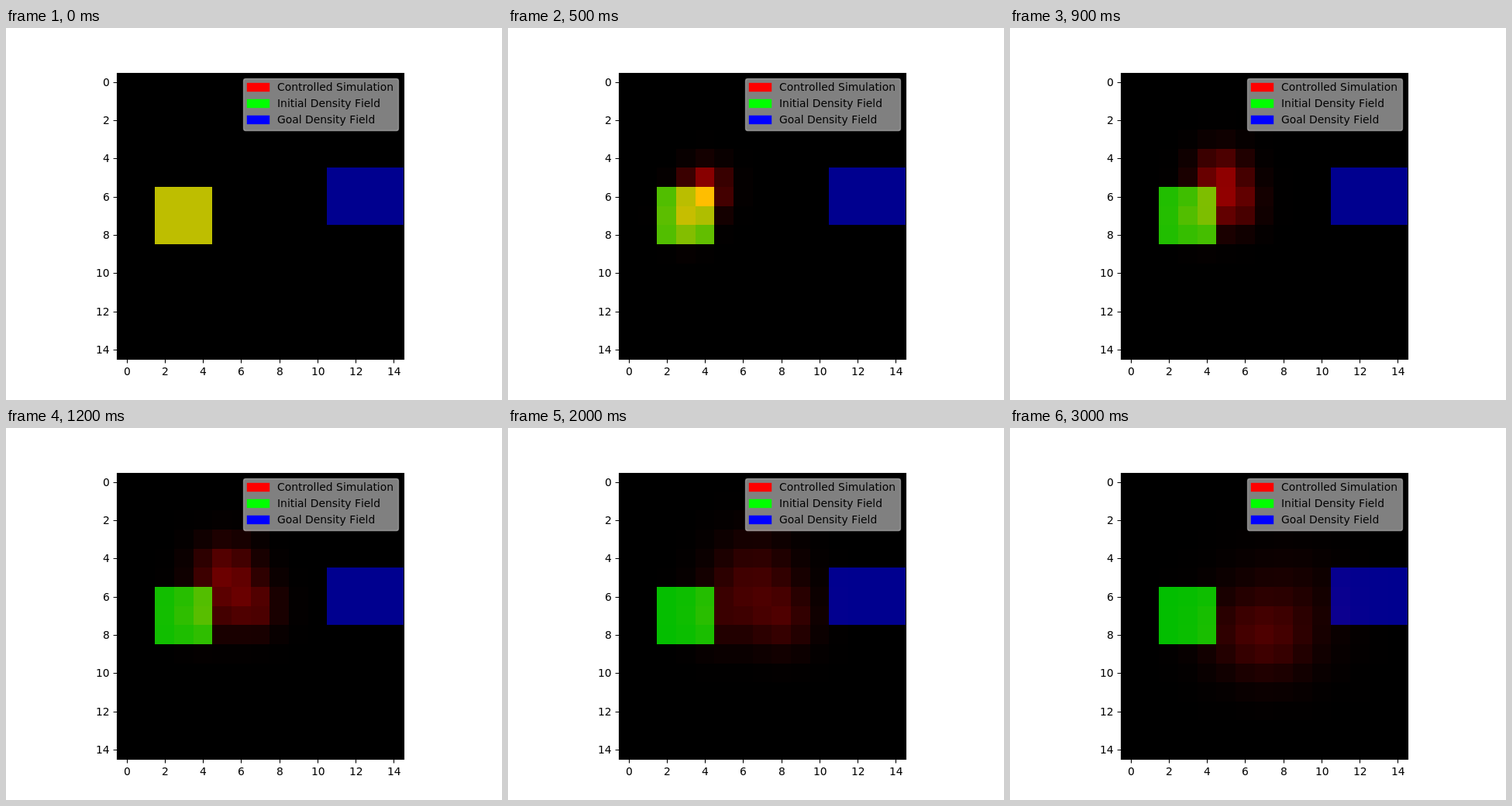
Animation, 640 px wide and 480 px high, one loop 3.3 s. Source, as an HTML page with a canvas:

```html
<!DOCTYPE html>
<html lang="en">
<head>
<meta charset="utf-8">
<title>Density field control</title>
<style>
  html, body { margin: 0; width: 100%; height: 100%; overflow: hidden; background: #fff; }
  canvas { display: block; }
</style>
</head>
<body>
<canvas id="stage" width="640" height="480"></canvas>
<script>
const ctx = document.getElementById('stage').getContext('2d');
const LOOP = 3300, END = 2850, DECAY = 480;
const N = 15, CELL = 24.64, LEFT = 143.2, TOP = 57.6;
const FULL = 190, GOAL = 143, MASS = 9 * FULL;
const FONT = '13.89px "DejaVu Sans", sans-serif';

// The plot refreshes every 100 ms, then at these moments.
const LATE = [1800, 2000, 2100, 2300, 2400, 2500, 2800, 3000];

// Density leaves the start square in three plumes that follow
// quadratic curves and widen steadily while keeping their mass.
const PLUMES = [
  { share: 0.5, x: [3.2, 5.6, 8], y: [6.7, 2.6, 6.9], r: 0.7, grow: 0.7 },
  { share: 0.3, x: [0.3, 10.7, 7.2], y: [6.6, 5.9, 8.3], r: 0.85, grow: 0.38 },
  { share: 0.2, x: [2.2, 5, 5.2], y: [8.1, 5.8, 7.8], r: 0.7, grow: 0.45 }
];

const edgeX = c => Math.round(LEFT + CELL * c);
const edgeY = r => r ? Math.floor(TOP + CELL * r) : 58;
const inStart = (c, r) => c >= 2 && c <= 4 && r >= 6 && r <= 8;
const inGoal = (c, r) => c >= 11 && r >= 5 && r <= 7;
const bezier = ([a, b, c], s) => a * (1 - s) ** 2 + 2 * b * s * (1 - s) + c * s * s;

function refreshTime(t) {
  return LATE.filter(s => s <= t).pop() ?? Math.floor(t / 100) * 100;
}

function plumesAt(t) {
  const s = Math.min(1, t / END);
  const lifted = MASS * (1 - Math.exp(-t / DECAY));
  return PLUMES.map(p => {
    const r2 = (p.r + p.grow * t / 1000) ** 2;
    return { x: bezier(p.x, s), y: bezier(p.y, s), r2, amp: p.share * lifted / (Math.PI * r2) };
  });
}

function drawField(t) {
  const plumes = plumesAt(t);
  const rest = FULL * Math.exp(-t / DECAY);
  for (let r = 0; r < N; r++) {
    for (let c = 0; c < N; c++) {
      const start = inStart(c, r);
      let red = start ? rest : 0;
      for (const p of plumes)
        red += p.amp * Math.exp(-((c - p.x) ** 2 + (r - p.y) ** 2) / p.r2);
      red = Math.min(255, Math.round(red));
      ctx.fillStyle = `rgb(${red},${start ? FULL : 0},${inGoal(c, r) ? GOAL : 0})`;
      const x = edgeX(c), y = edgeY(r);
      ctx.fillRect(x, y, edgeX(c + 1) - x, edgeY(r + 1) - y);
    }
  }
}

// Text starts on a whole pixel; align is 0.5 for centred, 1 for right.
function tickLabel(text, x, y, align) {
  const left = x - ctx.measureText(text).width * align;
  ctx.fillText(text, Math.round(left + 0.5), y);
}

function drawAxes() {
  ctx.strokeStyle = ctx.fillStyle = '#000';
  ctx.lineWidth = 1.11;
  ctx.strokeRect(143.5, 58.5, 370, 369);
  ctx.beginPath();
  for (let v = 0; v < N; v += 2) {
    const x = LEFT + CELL * (v + 0.5), y = TOP + CELL * (v + 0.5);
    const px = Math.round(x) + 0.5, py = Math.round(y) + 0.5;
    ctx.moveTo(px, 427.5);
    ctx.lineTo(px, 432.4);
    ctx.moveTo(143.5, py);
    ctx.lineTo(138.6, py);
    tickLabel(v, x, 448, 0.5);
    tickLabel(v, 133.48, Math.round(y) + 5, 1);
  }
  ctx.stroke();
}

function drawLegend() {
  ctx.lineWidth = 1.39;
  ctx.beginPath();
  ctx.roundRect(306.5, 65.5, 200, 67, 2.8);
  ctx.fillStyle = 'rgba(255,255,255,0.5)';
  ctx.fill();
  ctx.strokeStyle = 'rgba(204,204,204,0.5)';
  ctx.stroke();
  const rows = [
    ['#f00', 'Controlled Simulation'],
    ['#0f0', 'Initial Density Field'],
    ['#00f', 'Goal Density Field']
  ];
  rows.forEach(([color, text], i) => {
    const y = 71.5 + 21 * i;
    ctx.fillStyle = ctx.strokeStyle = color;
    ctx.fillRect(311.5, y, 28, 10);
    ctx.strokeRect(311.5, y, 28, 10);
    ctx.fillStyle = '#000';
    ctx.fillText(text, 350, y + 9.5);
  });
}

function draw(now) {
  ctx.fillStyle = '#fff';
  ctx.fillRect(0, 0, 640, 480);
  ctx.font = FONT;
  ctx.fontKerning = 'none';
  drawField(refreshTime(now % LOOP));
  drawAxes();
  drawLegend();
}

function tick() {
  draw(performance.now());
  requestAnimationFrame(tick);
}
tick();
</script>
</body>
</html>
```
